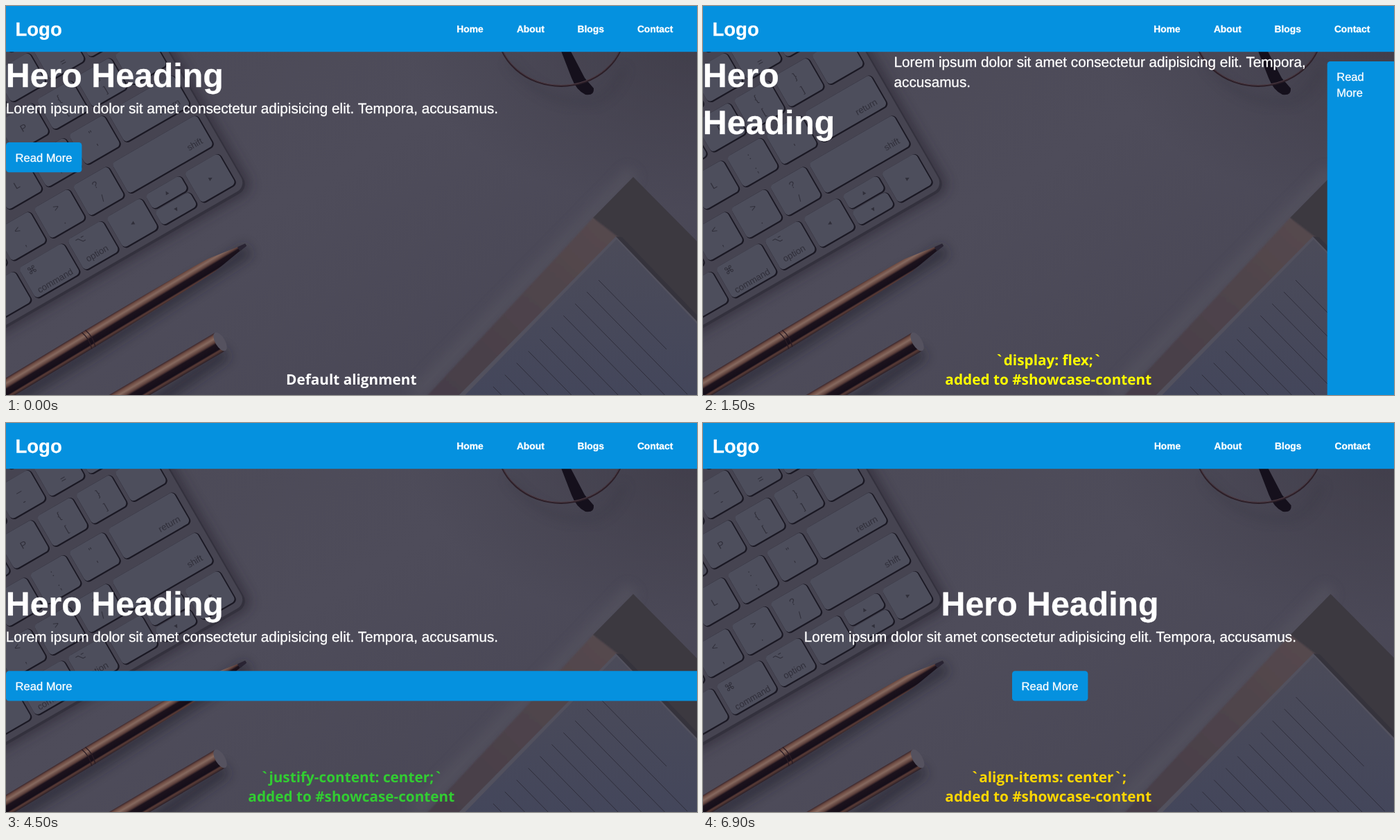
An HTML page that plays this animation: 997 by 562 pixels, repeating every 7.5 s.

```html
<!DOCTYPE html>
<html lang="en">
<head>
<meta charset="utf-8">
<title>Flex alignment steps</title>
<style>
  html, body { margin: 0; width: 100%; height: 100%; overflow: hidden; background: #4a4857; }
  svg { display: block; width: 997px; height: 562px; }
  text { white-space: pre; text-rendering: geometricPrecision; }
  .ui { font-family: "Liberation Sans", Arial, sans-serif; fill: #fff; stroke: #fff; stroke-width: .3px; }
  .bold { font-weight: 700; }
  .caption { font: 700 20.75px "Open Sans", sans-serif; text-anchor: middle; }
  .key { font-family: "Liberation Sans", "DejaVu Sans", sans-serif; fill: #302f3a; text-anchor: middle; }
</style>
</head>
<body>
<svg viewBox="0 0 997 562">
  <defs>
    <linearGradient id="desk" x1="0" y1="0" x2="1" y2="1">
      <stop offset="0" stop-color="#4b4956"/>
      <stop offset=".45" stop-color="#4e4c5a"/>
      <stop offset="1" stop-color="#474554"/>
    </linearGradient>
    <radialGradient id="dim" cx="1" cy="0.1" r=".42">
      <stop offset="0" stop-color="#3c3945" stop-opacity=".75"/>
      <stop offset="1" stop-color="#3c3945" stop-opacity="0"/>
    </radialGradient>
    <linearGradient id="metal" x1="0" y1="0" x2="0" y2="1">
      <stop offset="0" stop-color="#3a272d"/>
      <stop offset=".1" stop-color="#6e4b42"/>
      <stop offset=".24" stop-color="#86695f"/>
      <stop offset=".4" stop-color="#5c3f3b"/>
      <stop offset=".5" stop-color="#1c121c"/>
      <stop offset=".78" stop-color="#150e19"/>
      <stop offset=".86" stop-color="#5a3b36"/>
      <stop offset=".93" stop-color="#45302f"/>
      <stop offset="1" stop-color="#2a1e28"/>
    </linearGradient>
    <linearGradient id="paper" x1="0" y1="0" x2="0" y2="1">
      <stop offset="0" stop-color="#4b4b59"/>
      <stop offset="1" stop-color="#43465b"/>
    </linearGradient>
    <linearGradient id="cover" x1="1" y1="0" x2="0" y2="1">
      <stop offset="0" stop-color="#56494e"/>
      <stop offset="1" stop-color="#453d48"/>
    </linearGradient>
    <filter id="soft" x="-30%" y="-30%" width="160%" height="160%"><feGaussianBlur stdDeviation="8"/></filter>
    <filter id="edge"><feGaussianBlur stdDeviation="1.2"/></filter>
  </defs>

  <g id="page">
    <rect x="-10" y="-10" width="1020" height="590" fill="url(#desk)"/>
    <rect x="-10" y="-10" width="1020" height="590" fill="url(#dim)"/>

    <g transform="rotate(-30)">
      <rect x="-600" y="-100" width="779" height="509" rx="20" fill="#25222e" opacity=".5" filter="url(#soft)"/>
      <rect x="-600" y="-100" width="772" height="503" rx="16" fill="#33313d"/>
      <rect x="-600" y="-100" width="770" height="499" rx="15" fill="#464451"/>
      <g id="keys"></g>
    </g>

    <g id="glasses" fill="none">
      <path d="M725 80Q775 146 850 138Q880 125 892 88" stroke="#32303c" stroke-width="9" opacity=".3" filter="url(#soft)"/>
      <path d="M799 60L816 104Q823 122 836 128Q849 130 848 119Q842 112 835 104L812 60Z" fill="#15101c"/>
      <ellipse cx="801" cy="34" rx="92" ry="81.5" stroke="#2c1f28" stroke-width="2.8"/>
      <ellipse cx="801" cy="33.4" rx="91.4" ry="81" stroke="#54414a" stroke-width=".9"/>
    </g>

    <g id="pens">
      <path d="M350 352L130 495L0 575M318 500L210 575" fill="none" stroke="#1d1a27" stroke-width="20" opacity=".5" filter="url(#soft)"/>
      <g transform="translate(346 345) rotate(-31.1)">
        <path d="M0-1.5L-58-11Q-130-14-262-14H-440V14H-262Q-130 13-58 10L0 1.5Z" fill="url(#metal)"/>
        <path d="M0-2L-12-3.5V3.5L0 2Z" fill="#292433"/>
        <path d="M-262-14Q-257 0-262 14M-268-14Q-263 0-268 14" fill="none" stroke="#2a1c24" stroke-width="1.3"/>
      </g>
      <g transform="translate(309 485) rotate(-30.5)">
        <rect x="-220" y="-15" width="220" height="30" fill="url(#metal)"/>
        <ellipse rx="7" ry="15" fill="#55525f"/>
      </g>
    </g>

    <g id="notebook">
      <path d="M905 240L590 562" fill="none" stroke="#565461" stroke-width="22" opacity=".6" filter="url(#soft)"/>
      <path d="M905 247L1010 353V480L880 345L847 306Z" fill="#3c3940"/>
      <path d="M847 306L886 336L640 580H592Z" fill="url(#cover)" filter="url(#edge)"/>
      <path d="M880 333L889 334L1010 460V480L880 350Z" fill="#35333c"/>
      <path d="M880 333L1010 469V580H636Z" fill="#52515e"/>
      <path d="M881 337L1010 473V580H645Z" fill="url(#paper)"/>
      <g id="rules" stroke="#2e2d3a" stroke-width="1"></g>
    </g>

    <g id="steps"></g>

    <rect x="-10" y="-10" width="1020" height="76.2" fill="#0591df"/>
    <g class="ui bold" id="nav"></g>
  </g>
  <g id="captions"></g>
</svg>

<script>
  const STEP = 1500;
  const BLUE = "#0591df";
  const $ = id => document.getElementById(id);

  const text = (x, y, size, str, cls = "ui") =>
    `<text class="${cls}" x="${x}" y="${y}" font-size="${size}">${str}</text>`;

  // Keyboard, in coordinates turned to run along its rows
  const cap = (x, y, w, h = 51) =>
    `<rect x="${x}" y="${y}" width="${w + 1.8}" height="${h + 2.2}" rx="7" fill="#1a1823"/>` +
    `<rect x="${x}" y="${y}" width="${w}" height="${h}" rx="6" fill="#4d4e5c"/>`;
  const glyph = (x, y, str, size = 14) => text(x, y + size * .35, size, str, "key");

  // Each row: top, left edge of its wide last key, labels going left
  const rows = [
    [10, 100, []],
    [74, 67, ["+=", "_-"]],
    [139, 100, ["}]", "{[", "P"]],
    [206, 50, ["\"'", ":;", "L"]],
    [273, 18, ["?/", "&gt;|.", "&lt;|,"]]
  ];

  function buildKeys() {
    let out = "";
    for (const [y, edge, labels] of rows) {
      out += cap(edge, y, 159 - edge);
      for (let i = 0; i < 7; i++) {
        const x = edge - 65 * (i + 1);
        out += cap(x, y, 58);
        const label = labels[i];
        if (!label) continue;
        const parts = label.includes("|") ? label.split("|") : [...label];
        const gap = parts.length > 1 ? 11 : 0;
        parts.forEach((p, k) => out += glyph(x + 29, y + 26 + (k ? gap : -gap), p));
      }
    }
    out += cap(102, 337, 57) + cap(37, 337, 58, 24) + cap(37, 364, 58, 24);
    out += cap(-28, 337, 58) + cap(-93, 337, 58) + cap(-174, 337, 74);
    for (let x = -239; x > -500; x -= 65) out += cap(x, 337, 58);
    out += glyph(131, 363, "►", 9) + glyph(66, 349, "▲", 9);
    out += glyph(66, 377, "▼", 9) + glyph(1, 363, "◄", 9);
    out += glyph(131, 244, "return", 13) + glyph(136, 309, "shift", 13);
    out += glyph(-65, 375, "option", 13) + glyph(-137, 379, "command", 13);
    out += glyph(-76, 346, "⌥", 13) + glyph(-158, 349, "⌘", 14);
    return out;
  }

  function buildRules() {
    let out = "";
    for (let i = 0; i < 10; i++) {
      const x = 855 - 16.9 * i, y = 396 + 17.1 * i;
      const len = i ? 145 : 98;
      out += `<path d="M${x} ${y}l${len} ${len * 1.02}"/>`;
    }
    return out;
  }

  const LINE = "Lorem ipsum dolor sit amet consectetur adipisicing elit. Tempora,";
  const heading = (x, y, str) => text(x, y, 48.3, str, "ui bold");
  const para = (x, y, str) => text(x, y, 20.69, str);
  const label = (x, y, str) => text(x, y, 16.55, str);
  const box = (x, y, w, h) =>
    `<rect x="${x}" y="${y}" width="${w}" height="${h}" rx="4.3" fill="${BLUE}"/>`;

  const stack = (dy, width, hx = -.2, px = -.2, bx = 0) =>
    heading(hx, 117 + dy, "Hero Heading") +
    para(px, 155 + dy, LINE + " accusamus.") +
    box(bx, 197 + dy, width, 43.3) +
    label(bx + 13.6, 224.7 + dy, "Read More");

  const row =
    heading(-.2, 117, "Hero") + heading(-.2, 184.6, "Heading") +
    para(275.6, 87.5, LINE) + para(275.6, 116.5, "accusamus.") +
    box(900.7, 80, 120, 510) +
    label(914.2, 107.5, "Read") + label(914.2, 130.5, "More");

  const added = "added to #showcase-content";
  const steps = [
    { body: stack(0, 109.4), color: "#fff", lines: ["Default alignment"] },
    { body: row, color: "#ffff00", lines: ["`display: flex;`", added] },
    { body: stack(0, 1020), color: "#ffa500", lines: ["`flex-direction: column;`", added], shift: [-.6, -2.2] },
    { body: stack(161.3, 1020), color: "#32cd32", lines: ["`justify-content: center;`", added] },
    { body: stack(161.3, 109.4, 343, 145.1, 445.4), color: "#ffd700", lines: ["`align-items: center`;", added], shift: [.6, 0] }
  ];

  $("keys").innerHTML = buildKeys();
  $("rules").innerHTML = buildRules();
  $("nav").innerHTML = text(13.4, 42.8, 27.6, "Logo") +
    [["Home", 650], ["About", 736.6], ["Blogs", 824.2], ["Contact", 910.6]]
      .map(([name, x]) => text(x + .3, 38, 13.8, name)).join("");
  $("steps").innerHTML = steps.map(s => `<g>${s.body}</g>`).join("");
  $("captions").innerHTML = steps.map(s => `<g fill="${s.color}">` +
    s.lines.map((str, i) =>
      `<text class="caption" x="498.3" y="${547 - 28.4 * (s.lines.length - 1 - i)}">${str}</text>`
    ).join("") + "</g>").join("");

  const start = performance.now();
  let shown = -1;

  function show(n) {
    for (const id of ["steps", "captions"])
      [...$(id).children].forEach((g, i) => g.style.display = i === n ? "" : "none");
    const [x, y] = steps[n].shift || [0, 0];
    $("page").setAttribute("transform", `translate(${x} ${y})`);
    shown = n;
  }

  function tick() {
    const n = Math.floor((performance.now() - start) / STEP) % steps.length;
    if (n !== shown) show(n);
    requestAnimationFrame(tick);
  }
  tick();
</script>
</body>
</html>
```
